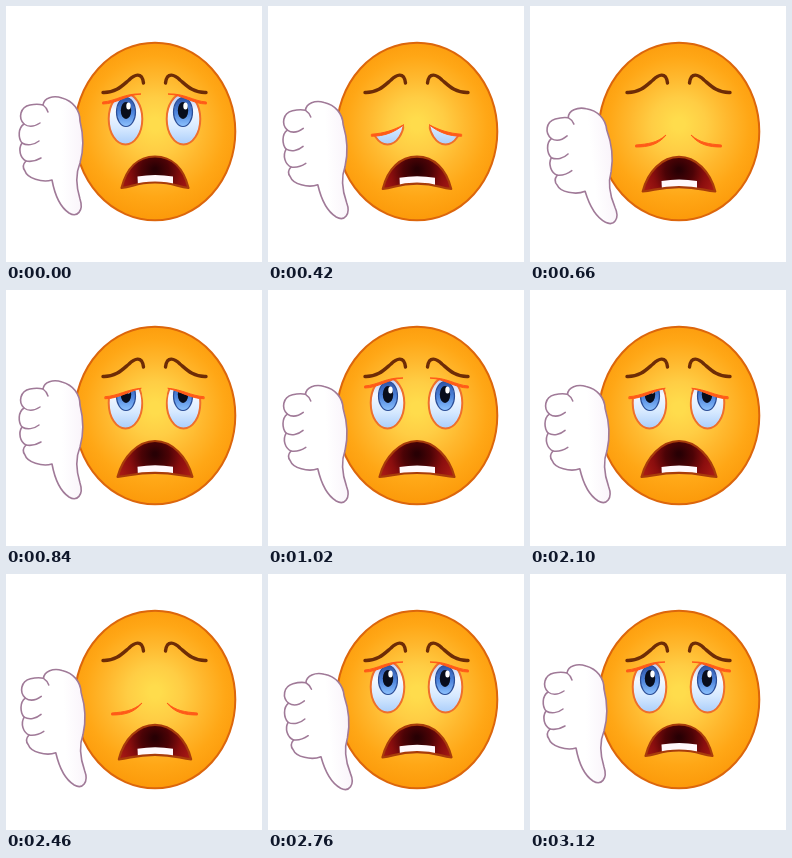
Animation, 256 px wide and 256 px high, one loop 3600 ms. Source, as an HTML page with a canvas:

```html
<!DOCTYPE html>
<html lang="en">
<head>
<meta charset="utf-8">
<title>Thumbs down</title>
<style>
  html, body { margin: 0; width: 100%; height: 100%; overflow: hidden; background: #fff; }
  canvas { display: block; width: 256px; height: 256px; }
</style>
</head>
<body>
<canvas id="stage" width="256" height="256"></canvas>
<script>
const ctx = document.getElementById('stage').getContext('2d');
const LOOP = 3600, STEP = 60, MID = 148.5;

const clamp = v => Math.max(0, Math.min(1, v));
const mix = (a, b, t) => a + (b - a) * t;
const smooth = v => { v = clamp(v); return v * v * (3 - 2 * v); };

function gradient(g, ...colors) {
  colors.forEach((c, i) => g.addColorStop(i / (colors.length - 1), c));
  return g;
}

function paint(path, fill, stroke, width) {
  if (fill) { ctx.fillStyle = fill; ctx.fill(path); }
  if (stroke) {
    ctx.strokeStyle = stroke;
    ctx.lineWidth = width;
    ctx.stroke(path);
  }
}

function oval(x, y, rx, ry, tilt = 0) {
  const p = new Path2D();
  p.ellipse(x, y, rx, ry, tilt, 0, Math.PI * 2);
  return p;
}

const face = oval(149, 125.5, 80.3, 88.8);
const faceFill = gradient(ctx.createRadialGradient(149, 118, 6, 149, 122, 92),
  '#ffdc4c', '#ffcd44', '#ffb82e', '#ffa716', '#fc9a0a');
const brow = new Path2D('M97 86.5 C110 87 117 79 123 74 C128 69 136 65 137.5 77');
const eye = oval(119.5, 113, 16.8, 25.5);
const eyeFill = gradient(ctx.createLinearGradient(0, 88, 0, 139), '#b9c9f2', '#f6f9ff', '#d6e9ff', '#a9cdfa');
const irisFill = gradient(ctx.createLinearGradient(0, 92, 0, 121), '#2f55a8', '#4d84dc', '#8fc4ff');

const hand = new Path2D(`M37 99 C38 92 47 89 56 92 C67 95 74 104 74 115
  C77 127 78 143 74 157 C69 169 70 180 74 193 C78 205 71 212 63 207
  C54 201 49 190 46 174 C36 177 21 172 19 165 C16 161 17 158 20 155
  C14 152 12 143 16 137 C12 132 12 122 18 118 C12 112 14 101 24 99 C29 98 33 98 37 99Z`);
const creases = new Path2D(`M18 118 C22 121 28 121 34 117 M16 137 C21 140 28 139 33 135
  M20 155 C25 156 30 155 35 152 M37 99 C40 101 41 103 42 106`);
const handFill = gradient(ctx.createLinearGradient(12, 0, 78, 0), '#fff', '#fff', '#fff', '#f9f3fa');

function lidEdge(lid) {
  return {
    outer: [mix(97, 106, lid), mix(98, 141, lid)],
    bend: [mix(110, 118, lid), mix(98, 141, lid), mix(120, 128, lid), mix(89, 139, lid)],
    inner: [mix(135, 136, lid), mix(88, 129, lid)]
  };
}

function drawEye(lid, side) {
  const { outer, bend, inner } = lidEdge(lid);
  if (lid < 1) {
    ctx.save();
    const open = new Path2D();
    open.moveTo(90, outer[1]);
    open.lineTo(...outer);
    open.bezierCurveTo(...bend, ...inner);
    open.lineTo(142, 145);
    open.lineTo(90, 145);
    open.closePath();
    ctx.clip(open);
    paint(eye, eyeFill, '#ee6f2c', 2);
    ctx.clip(eye);
    paint(oval(120, 106, 9.5, 14.5), irisFill, '#2b4d96', 1.2);
    paint(oval(120, 104.5, 5.2, 8.5), '#080d1c');
    paint(oval(120 + 2.5 * side, 100, 2.2, 3.6), '#fff');
    ctx.restore();
  }
  const wedge = new Path2D();
  wedge.moveTo(...outer);
  wedge.bezierCurveTo(...bend, ...inner);
  wedge.bezierCurveTo(bend[2] - 1, bend[3] - 2, bend[0], bend[1] - 3, outer[0], outer[1] - 2);
  wedge.closePath();
  paint(wedge, '#ff5a18', '#ff5a18', 1);
}

function drawMouth(open) {
  const w = mix(33.5, 37.5, open), corner = mix(182, 187, open);
  const top = mix(150.5, 151, open), base = mix(176.5, 183, open);
  const left = 149 - w, right = 149 + w;
  const mouth = new Path2D();
  mouth.moveTo(left, corner);
  mouth.bezierCurveTo(left + 5, corner - 20, 132, top, 149, top);
  mouth.bezierCurveTo(166, top, right - 5, corner - 20, right, corner);
  mouth.bezierCurveTo(right - 12, corner - 1, 169, base, 149, base);
  mouth.bezierCurveTo(129, base, left + 12, corner - 1, left, corner);
  paint(mouth, gradient(ctx.createRadialGradient(149, top + 13, 2, 149, top + 16, 38),
    '#280004', '#4c0306', '#8a0e0e', '#a81a14'));
  ctx.save();
  ctx.clip(mouth);
  const teeth = new Path2D();
  teeth.moveTo(132, base + 4);
  teeth.lineTo(131.5, base - 6);
  teeth.quadraticCurveTo(149, base - 9, 167, base - 6);
  teeth.lineTo(167, base + 4);
  paint(teeth, '#fff8fb');
  ctx.restore();
  paint(mouth, null, '#a83c0a', 2.2);
}

function drawHand(swing) {
  ctx.save();
  ctx.translate(44, 88 + 13 * swing);
  ctx.rotate(-.115 * swing);
  ctx.translate(-44, -88);
  paint(hand, handFill, '#a07a98', 1.6);
  paint(creases, null, '#a07a98', 1.5);
  ctx.restore();
}

// A rest of two steps followed by an eight-step dip.
function swingAt(step) {
  const phase = step % 10;
  return phase <= 2 ? 0 : Math.sin(Math.PI * (phase - 2) / 8);
}

function poseAt(time) {
  const first = time < 2040;
  const step = Math.max(0, Math.floor((time - (first ? 240 : 2040)) / STEP));
  const handStep = first ? step : step + 2;
  return {
    lid: clamp(Math.min(step, 11 - step) / 4),
    mouth: first ? smooth(step / 11) : 1 - smooth(step / 18),
    swing: handStep < 20 ? swingAt(handStep) : 0
  };
}

function draw(time) {
  const pose = poseAt(time);
  ctx.fillStyle = '#fff';
  ctx.fillRect(0, 0, 256, 256);
  ctx.lineCap = ctx.lineJoin = 'round';
  paint(face, faceFill, '#dc660c', 2);
  for (const side of [1, -1]) {
    ctx.save();
    if (side < 0) {
      ctx.translate(MID * 2, 0);
      ctx.scale(-1, 1);
    }
    drawEye(pose.lid, side);
    paint(brow, null, '#6e2c06', 3.4);
    ctx.restore();
  }
  drawMouth(pose.mouth);
  drawHand(pose.swing);
}

const start = performance.now();
function tick() {
  draw((performance.now() - start) % LOOP);
  requestAnimationFrame(tick);
}
tick();
</script>
</body>
</html>
```
